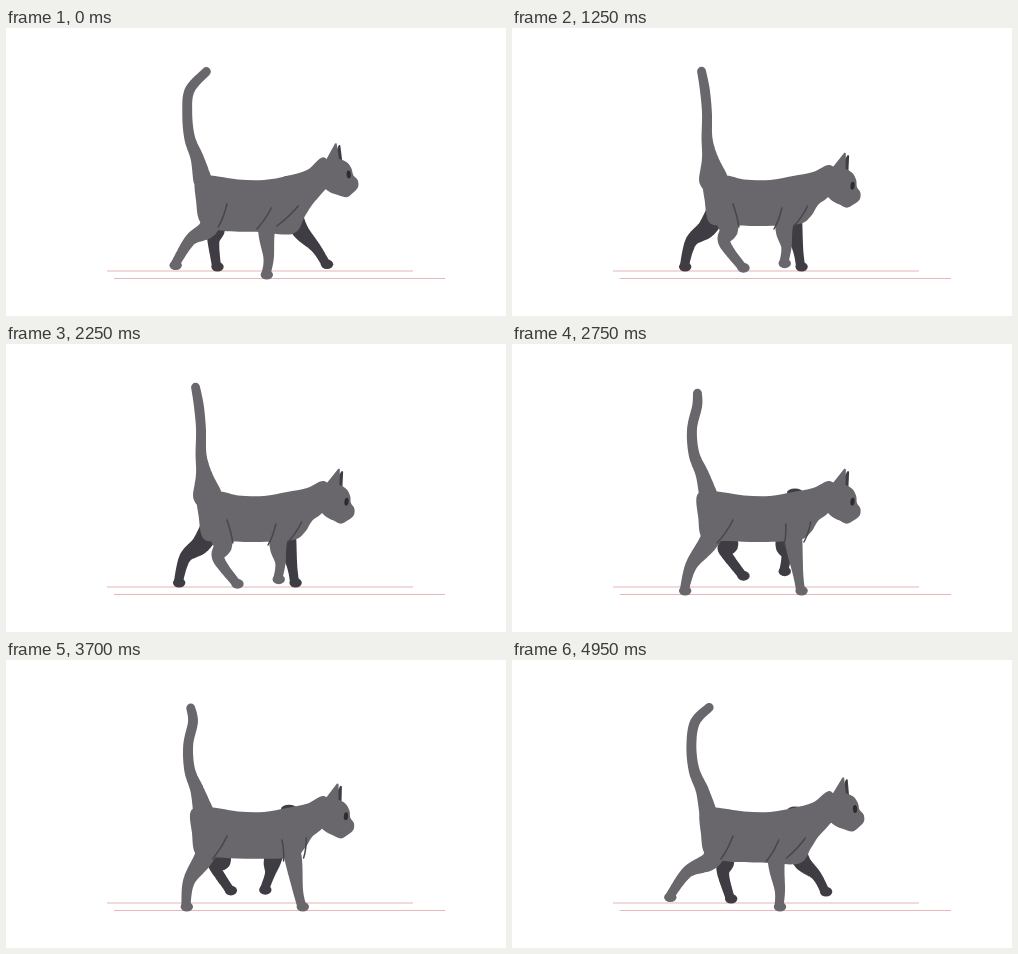
Recreate the animation shown at these times as an HTML page with a canvas. Size 500 by 288 pixels, loop 5 s.

```html
<!DOCTYPE html>
<html lang="en">
<head>
<meta charset="utf-8">
<title>Walking cat</title>
<style>
  html, body { margin: 0; width: 100%; height: 100%; overflow: hidden; background: #fff; }
  canvas { display: block; width: 100vw; height: 100vh; }
</style>
</head>
<body>
<canvas id="stage" width="500" height="288"></canvas>
<script>
const ctx = document.getElementById('stage').getContext('2d');
const POSES = 18, HALF = POSES / 2;
const FUR = '#69666c', SHADE = '#3f3d43', FOLD = '#48464c', GROUND = '#e8b6b6';

// Cosine that peaks at the given pose, n times per stride.
const wave = (pose, mean, amp, peak, n = 1) =>
  mean + amp * Math.cos(2 * Math.PI * n * (pose - peak) / POSES);

// Quick forward flick around the zero pose, slow return.
function flick(pose, zero, a, b) {
  const t = 2 * Math.PI * (pose - zero) / POSES;
  return -a * Math.sin(t) - b * Math.sin(2 * t);
}

// Share of a step done since the start pose; above 1 once it is over.
const since = (pose, start, length) => ((pose - start + 2 * POSES) % POSES) / length;

// Joints of a hind leg: the paw slides back on the ground, then swings forward.
function hindLeg(pose, floor) {
  const u = since(pose, 16.5, 9), swing = u < 1;
  const x = swing ? 153 + 69 * u + 50 * u * Math.sin(Math.PI * u) : 222 - 69 * (u - 1);
  const y = floor - (swing ? 9.5 * (1 - u ** 4) : 0);
  return {
    knee: [wave(pose, 206, 11, 5.5), 200],
    ankle: [x + flick(pose, 2, 14.5, 6.4), y - 25],
    paw: [x, y]
  };
}

function foreLeg(pose, floor) {
  const u = since(pose, 2, 7.5), swing = u < 1;
  const x = swing ? 245 + 76 * u * u * (3 - 2 * u) : 321 - 54 * (u - 1);
  const y = floor - (swing ? 12 * Math.sin(Math.PI * u) : 0);
  return {
    knee: [wave(pose, 277, 18, 10.3), 201],
    ankle: [x - 1.5 + flick(pose, 6, 7.5, 2.5), y - 16],
    paw: [x, y]
  };
}

const spline = (a, b, c, d, u) =>
  b + u * ((c - a) + u * ((2 * a - 5 * b + 4 * c - d) + u * (3 * (b - c) + d - a))) / 2;

// Rounded limb through points [x, y, radius].
function limb(points, color) {
  const steps = 24, at = i => points[Math.max(0, Math.min(points.length - 1, i))];
  ctx.beginPath();
  for (let i = 0; i < points.length - 1; i++) {
    for (let s = 0; s <= steps; s++) {
      const [x, y, r] = [0, 1, 2].map(k =>
        spline(at(i - 1)[k], at(i)[k], at(i + 1)[k], at(i + 2)[k], s / steps));
      ctx.moveTo(x + r, y);
      ctx.arc(x, y, r, 0, 7);
    }
  }
  ctx.fillStyle = color;
  ctx.fill();
}

// Smooth closed shape.
function blob(points, color) {
  const n = points.length, at = i => points[(i + n) % n];
  ctx.beginPath();
  ctx.moveTo(...points[0]);
  for (let i = 0; i < n; i++) {
    const [a, b, c, d] = [at(i - 1), at(i), at(i + 1), at(i + 2)];
    ctx.bezierCurveTo(b[0] + (c[0] - a[0]) / 6, b[1] + (c[1] - a[1]) / 6,
                      c[0] - (d[0] - b[0]) / 6, c[1] - (d[1] - b[1]) / 6, c[0], c[1]);
  }
  ctx.fillStyle = color;
  ctx.fill();
}

function oval(x, y, rx, ry, color) {
  ctx.beginPath();
  ctx.ellipse(x, y, rx, ry, 0, 0, 7);
  ctx.fillStyle = color;
  ctx.fill();
}

function ear(a, tip, b, color) {
  ctx.beginPath();
  ctx.moveTo(...a);
  ctx.lineTo(...tip);
  ctx.lineTo(...b);
  ctx.closePath();
  ctx.fillStyle = ctx.strokeStyle = color;
  ctx.lineWidth = 2;
  ctx.lineJoin = 'round';
  ctx.fill();
  ctx.stroke();
}

function crease(x1, y1, x2, y2) {
  ctx.strokeStyle = FOLD;
  ctx.lineWidth = 1.5;
  ctx.lineCap = 'round';
  ctx.beginPath();
  ctx.moveTo(x1, y1);
  ctx.quadraticCurveTo((x1 + x2) / 2 + 1.5, (y1 + y2) / 2 + 1, x2, y2);
  ctx.stroke();
}

function ground(x1, x2, y) {
  ctx.fillStyle = GROUND;
  ctx.fillRect(x1, y, x2 - x1, 1);
}

function drawLeg({ knee, ankle, paw }, root, kneeR, ankleR, color) {
  limb([root, [...knee, kneeR], [...ankle, ankleR], [...paw, 4.5]], color);
  oval(paw[0] + 1, paw[1] + .3, 6.2, 4.8, color);
}
const drawHind = (leg, color) => drawLeg(leg, [207, 180, 11], 9.5, 6, color);
const drawFore = (leg, color) => drawLeg(leg, [leg.knee[0] / 2 + 140, 181, 9], 8.6, 5.2, color);

// The sway runs up the tail; the tip whips twice per stride.
function drawTail(pose, back) {
  const tip = [wave(pose, wave(pose, 191.5, 6, 1.5), 4, .6, 2),
               wave(pose, wave(pose, 46.5, 6, 11), 4.5, 7.3, 2)];
  const thick = back - 188;
  limb([
    [...tip, 4.5],
    [wave(pose, 189, 6, 7.5), 62, 5],
    [wave(pose, 187.5, 9, 6.7), 85, 5],
    [wave(pose, 188.5, 7.5, 6.5), 110, 5.5],
    [wave(pose, 194, 4.5, 6.5), 130, 4.5 + thick * .13],
    [back / 2 + 94, 151, thick / 2 + 1]
  ], FUR);
}

function drawHead(x, y, tilt) {
  ctx.save();
  ctx.translate(x, y);
  ctx.rotate(tilt * Math.PI / 180);
  ear([-23, -20], [-16, -36], [-15, -19], SHADE);
  ear([-31, -20], [-19.5, -38], [-18, -20], FUR);
  blob([[-34, -17], [-28, -22], [-18, -23], [-10, -19.5], [-5.5, -13], [-4, -6], [0, -1],
        [0, 6], [-6, 12], [-12, 15.5], [-20, 13], [-29, 9], [-36, 0]], FUR);
  oval(-8.5, -7, 2.1, 4, '#2c2b30');
  ctx.restore();
}

function draw(pose) {
  const other = pose + HALF;
  const dip = wave(pose, 0, 1, 5, 2);
  const back = wave(pose, 209.5, 6.5, 7);
  const rump = wave(pose, 189.5, 3.5, 4);
  const nose = [wave(pose, 349.8, 2, 8.5, 2), 159 + 6.5 * dip];
  const hind = hindLeg(pose, 246.5), fore = foreLeg(pose, 246.5);

  ctx.fillStyle = '#fff';
  ctx.fillRect(0, 0, 500, 288);
  ground(101, 407, 242.5);
  ground(108, 439, 250);

  drawHind(hindLeg(other, 238.5), SHADE);
  drawFore(foreLeg(other, 238.5), SHADE);
  oval(283, wave(pose, 152.5, 4, 5), 8, 4, SHADE);

  drawTail(pose, back);
  blob([[rump - .5, 150], [back, 147.5], [232, 151.5], [258, 152], [281, 148],
        [301, 143 + dip], [318, 133 + 4 * dip], [328, 150], [317, 166 + 2 * dip],
        [306, 177], [299, 188], [287, 201 - 5 * dip], [250, 201 - 3 * dip],
        [217, 200 - 3 * dip], [rump + 5, 195], [rump, 173]], FUR);
  drawHind(hind, FUR);
  drawFore(fore, FUR);
  drawHead(...nose, 1 + 5 * dip);

  const knee = hind.knee[0], elbow = fore.knee[0];
  crease(221, 176, knee + 10, 199);
  crease(elbow * .4 + 161, 180, elbow - 10, 201);
  crease(elbow * .3 + 214, 178, elbow + 10, 198);
}

// Eighteen poses a second, shown on a 50 ms clock.
const start = performance.now();
function run() {
  const tick = Math.floor((performance.now() - start) % 1000 / 50);
  draw(Math.floor((tick * 9 + 5) / 10));
  requestAnimationFrame(run);
}
run();
</script>
</body>
</html>
```
